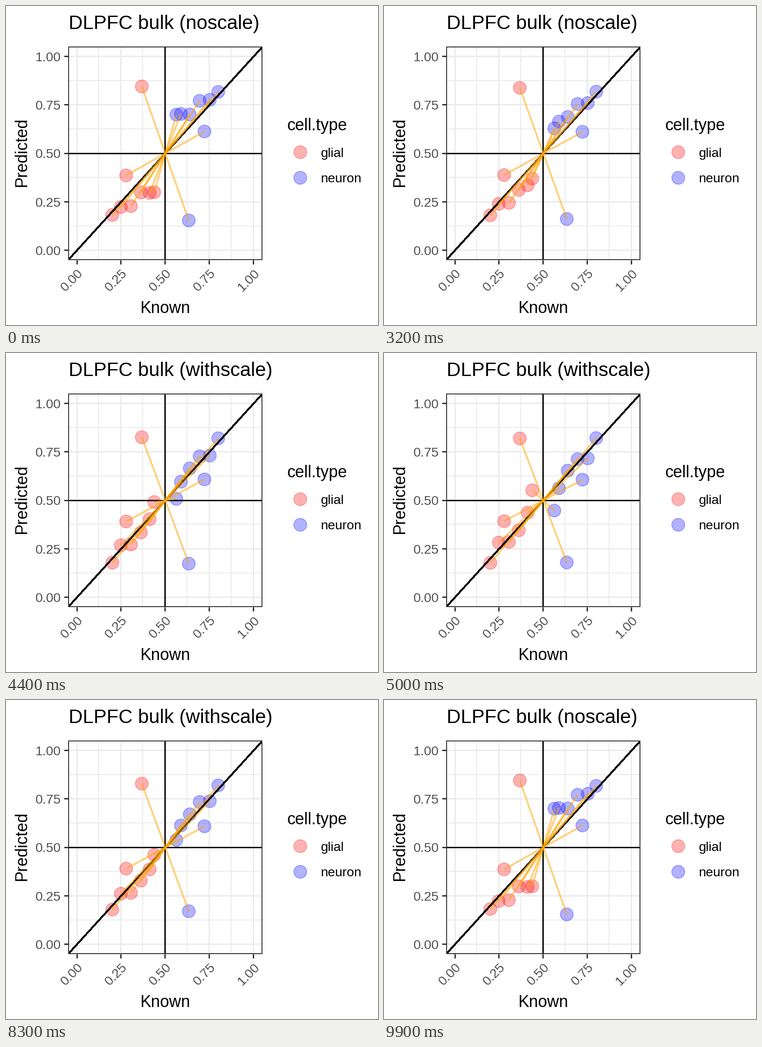
These frames come from a looping animation (808x693 px, 10 s). A matplotlib script:

```python
import matplotlib.pyplot as plt
from matplotlib.animation import FuncAnimation
from matplotlib.patches import Circle, Rectangle

W, H, DPI = 808, 693, 64
PT = 72 / DPI                       # points per pixel
LEFT, RIGHT, TOP, BOTTOM = 135, 557, 88, 552
CX, CY = 346.0, 320.3               # centre of the panel
SX, SY = 383.9, 421.4               # pixels per data unit
PEN = 0.55                          # straight rules snap to the pixel before
BASE = 35.6                         # base font size in pixels
RED, BLUE = (1, 0, 0, 0.3), (0, 0, 1, 0.3)

# offsets from the centre: x, y without scaling, y with scaling
# neurons mirror the glial points
GLIAL = [
    (-51.0, -145.5, -134.7), (-85.0, 47.7, 45.1), (-53.1, 84.7, 64.8),
    (-34.0, 85.7, 26.5), (-24.0, 84.3, -22.0), (-96.6, 116.5, 91.5),
    (-74.6, 114.3, 89.9), (-115.0, 133.7, 135.5),
]

plt.rcParams["font.family"] = "Liberation Sans"
fig = plt.figure(figsize=(W / DPI, H / DPI), dpi=DPI, facecolor="white")
ax = fig.add_axes([0, 0, 1, 1])
ax.set(xlim=(0, W), ylim=(H, 0))
ax.axis("off")

panel = Rectangle((LEFT, TOP), RIGHT - LEFT, BOTTOM - TOP,
                  transform=ax.transData)
ax.add_patch(Rectangle((LEFT + 1, TOP + 1), RIGHT - LEFT - 2,
                       BOTTOM - TOP - 2, fill=False, ec="#333333",
                       lw=2 * PT, zorder=9))


def px(v):
    return CX + (v - 0.5) * SX


def py(v):
    return CY - (v - 0.5) * SY


def line(xs, ys, color, width, z, clip=True, **kw):
    item, = ax.plot(xs, ys, color=color, lw=width * PT, zorder=z,
                    solid_capstyle="butt", **kw)
    if clip:
        item.set_clip_path(panel)
    return item


def vline(x, y0, y1, *style):
    line([x - PEN] * 2, [y0, y1], *style)


def hline(y, x0, x1, *style):
    line([x0, x1], [y - PEN] * 2, *style)


def dot(x, y, color):
    return ax.add_patch(Circle((x, y), 14, fc=color, ec=color,
                               lw=1.8 * PT, zorder=4))


def label(x, y, text, size=1.0, color="black", **kw):
    return ax.text(x, y, text, fontsize=BASE * size * PT, color=color,
                   va="baseline", rotation_mode="anchor", **kw)


for i in range(9):
    v = i / 8
    major = i % 2 == 0
    width, z = (3, 2) if major else (2, 1)
    vline(px(v), TOP, BOTTOM, "#EBEBEB", width, z)
    hline(py(v), LEFT, RIGHT, "#EBEBEB", width, z)
    if major:
        vline(px(v), BOTTOM, BOTTOM + 9, "#333333", 3, 3, False)
        hline(py(v), LEFT - 9, LEFT, "#333333", 3, 3, False)
        label(119.3, py(v) + 10, f"{v:.2f}", 0.8, "#4D4D4D", ha="right")
        label(px(v) + 14, 581.6, f"{v:.2f}", 0.8, "#4D4D4D",
              ha="right", rotation=45)

vline(CX, TOP, BOTTOM, "black", 3, 5)
hline(CY, LEFT, RIGHT, "black", 3, 5)
line([px(-0.1), px(1.1)], [py(-0.1), py(1.1)], "black", 2.8, 5,
     antialiased=False)

title = label(135.5, 50, "", 1.19)
label(CX, 667, "Known", ha="center")
label(43.7, CY - 2, "Predicted", ha="center", rotation=90)
label(611, 269.5, "cell.type")
for y, name, color in [(317.6, "glial", RED), (373.2, "neuron", BLUE)]:
    dot(639.2, y, color)
    label(683.3, y + 10.2, name, 0.8)

marks = []
for dx, d0, d1 in GLIAL:
    for sign, color in [(1, RED), (-1, BLUE)]:
        x = CX + sign * dx
        spoke = line([], [], "#FFA500", 2.7, 6, alpha=0.5, antialiased=False)
        marks.append((x, CY + sign * d0, CY + sign * d1,
                      dot(x, CY, color), spoke))


def ramp(frame, start):
    return min(max(frame - start, 0), 25)


def draw(frame):
    out, back = ramp(frame, 25), ramp(frame, 74)
    scaled = out >= 14 and back < 14
    title.set_text(f"DLPFC bulk ({'with' if scaled else 'no'}scale)")
    t = (out - back) / 25
    for x, y0, y1, circle, spoke in marks:
        y = y0 + (y1 - y0) * t
        circle.center = (x, y)
        spoke.set_data([x, CX], [y, CY])
    return []


anim = FuncAnimation(fig, draw, frames=100, interval=100,
                     init_func=lambda: draw(0), repeat=True, repeat_delay=0)
plt.show()
```
